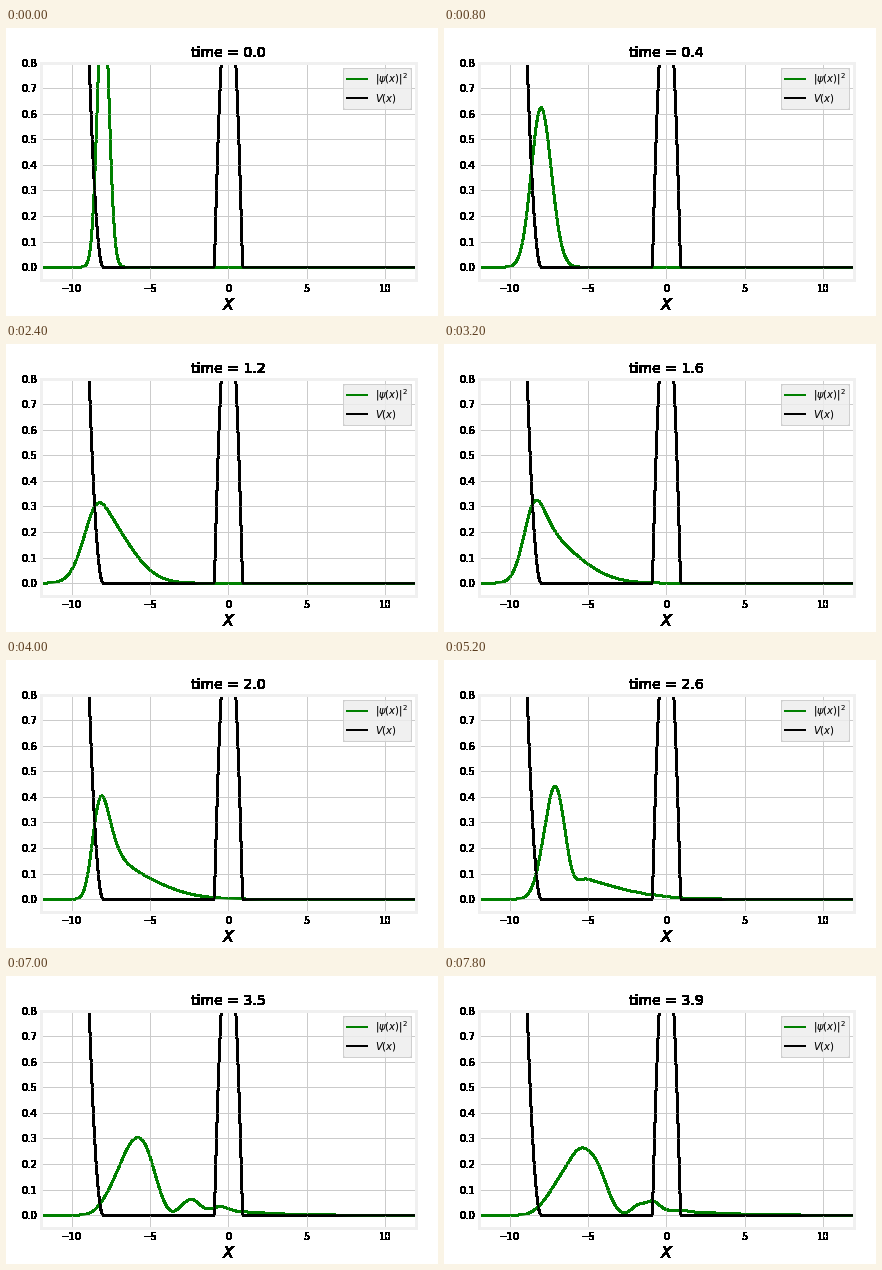
A matplotlib script for the animation above (8 s loop, 432x288 px).

```python
import numpy as np
import matplotlib.pyplot as plt
from matplotlib.animation import FuncAnimation

FRAMES, INTERVAL = 40, 200
DT, SUBSTEPS = 0.1, 40
START, WIDTH = -8.0, 0.5


def potential(x):
    wall = np.where(x < -8, (x + 8) ** 2, 0.0)
    barrier = np.where(np.abs(x) < 0.9, 1.09 * (1 - (x / 0.9) ** 2), 0.0)
    return wall + barrier


def evolve(x, v):
    """Split-step Schrodinger evolution, one density per frame."""
    dx = x[1] - x[0]
    k = 2 * np.pi * np.fft.fftfreq(x.size, dx)
    h = DT / SUBSTEPS
    half_v = np.exp(-0.5j * v * h)
    full_k = np.exp(-0.5j * k ** 2 * h)
    psi = np.exp(-(x - START) ** 2 / (2 * WIDTH ** 2)).astype(complex)
    psi /= np.sqrt(np.sum(np.abs(psi) ** 2) * dx)
    out = []
    for _ in range(FRAMES):
        out.append(np.abs(psi) ** 2)
        for _ in range(SUBSTEPS):
            psi = half_v * np.fft.ifft(full_k * np.fft.fft(half_v * psi))
    return out


def harden(img, dpi):
    """Make every touched pixel opaque, for crisp heavy edges."""
    img = np.rint(img * 255).astype(np.uint8)
    img[..., 3] = np.where(img[..., 3] > 0, 255, 0)
    return img, 0, 0


x = np.linspace(-40, 40, 4096, endpoint=False)
v = potential(x)
density = evolve(x, v)

plt.rcParams.update({"font.family": "DejaVu Sans", "mathtext.fontset": "dejavusans"})
fig = plt.figure(figsize=(6, 4), dpi=72, facecolor="white")
ax = fig.add_axes([0.08, 0.125, 0.87, 0.755])
ax.patch.set_visible(False)
ax.set_agg_filter(harden)
ax.set(xlim=(-12, 12), ylim=(-0.05, 0.8), xticks=range(-10, 11, 5))
ax.set_axisbelow(True)
ax.grid(color="#cbcbcb", lw=1)
for spine in ax.spines.values():
    spine.set(color="#f0f0f0", lw=3)
ax.tick_params(length=0, pad=3.5, labelsize=10)
ax.set_xlabel("X", fontsize=16, fontstyle="italic")
title = ax.set_title("", fontsize=14)

wave, = ax.plot(x, density[0], color="green", lw=2, label=r"$|\psi(x)|^2$")
ax.plot(x, v, color="black", lw=2, label="$V(x)$")
ax.legend(loc="upper right", fontsize=10, facecolor="#f0f0f0")


def update(i):
    wave.set_ydata(density[i])
    title.set_text(f"time = {i * DT:.1f}")
    return wave, title


anim = FuncAnimation(fig, update, frames=FRAMES, interval=INTERVAL, repeat=True)
plt.show()
```
